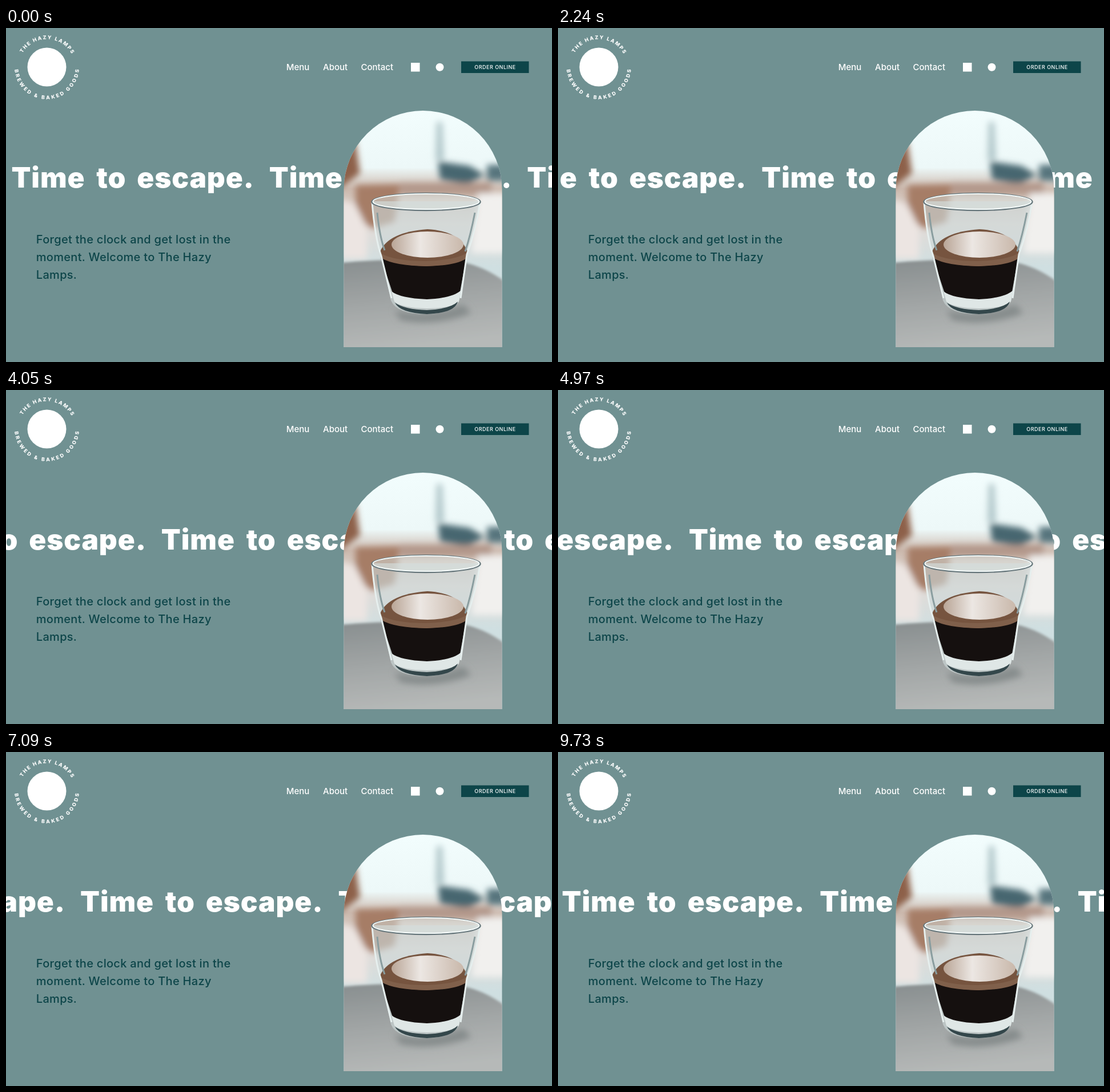
Animation, 956 px wide and 586 px high, one loop 9.8 s. Source, as an HTML page:

```html
<!DOCTYPE html>
<html lang="en">
<head>
<meta charset="utf-8">
<title>Time to escape</title>
<style>
  html, body { margin: 0; width: 100%; height: 100%; overflow: hidden; background: #709192; }
  svg { display: block; width: 100vw; height: 100vh; }
  text { font-family: Inter, "Open Sans", sans-serif; fill: #fff; white-space: pre; }
  .nav { font-size: 15px; font-weight: 500; }
  .order { font-size: 9px; font-weight: 500; letter-spacing: .5px; text-anchor: middle; }
  .ring { font-size: 8.8px; font-weight: 800; text-anchor: middle; }
  .intro { font-size: 20px; font-weight: 500; letter-spacing: .3px; fill: #0d4549; }
  .slogan { font-size: 49.5px; font-weight: 900; letter-spacing: .9px; }
</style>
</head>
<body>
<svg viewBox="0 0 956 586" preserveAspectRatio="none">
  <defs>
    <clipPath id="arch"><path d="M591.5 560V283.5A138.5 138.5 0 0 1 868.5 283.5V560Z"/></clipPath>
    <filter id="soft" x="-50%" y="-50%" width="200%" height="200%"><feGaussianBlur stdDeviation="6"/></filter>
    <filter id="haze" x="-50%" y="-50%" width="200%" height="200%"><feGaussianBlur stdDeviation="2"/></filter>
    <linearGradient id="room" x1="0" y1="0" x2="0" y2="1">
      <stop offset="0" stop-color="#f2fdfd"/>
      <stop offset=".24" stop-color="#edf8f8"/>
      <stop offset=".33" stop-color="#cdbbb0"/>
      <stop offset=".48" stop-color="#e2dbd7"/>
      <stop offset=".66" stop-color="#cfdfe1"/>
    </linearGradient>
    <linearGradient id="stone" x1="0" y1="0" x2=".2" y2="1">
      <stop offset="0" stop-color="#888e8f"/>
      <stop offset=".5" stop-color="#a1a5a5"/>
      <stop offset="1" stop-color="#b6b9b8"/>
    </linearGradient>
    <linearGradient id="foam" x1="0" y1="0" x2="1" y2="0">
      <stop offset="0" stop-color="#b9a596"/>
      <stop offset=".4" stop-color="#ece7e3"/>
      <stop offset="1" stop-color="#c9b8ab"/>
    </linearGradient>
    <path id="upper" d="M22.5 68.5A49 49 0 0 1 120.5 68.5"/>
    <path id="lower" d="M18.4 49.2A56.5 56.5 0 1 0 124.6 49.2"/>
  </defs>

  <rect width="956" height="586" fill="#709192"/>

  <circle cx="71.5" cy="68.5" r="34" fill="#fff"/>
  <text class="ring" letter-spacing="1.9"><textPath href="#upper" startOffset="51%">THE HAZY LAMPS</textPath></text>
  <text class="ring" letter-spacing="2.9"><textPath href="#lower" startOffset="50.7%">BREWED &amp; BAKED GOODS</textPath></text>

  <text class="nav" x="490.7" y="74">Menu</text>
  <text class="nav" x="555" y="74">About</text>
  <text class="nav" x="621.5" y="74">Contact</text>
  <rect x="709" y="61" width="15.5" height="15.5" fill="#fff"/>
  <circle cx="759.5" cy="68.7" r="7" fill="#fff"/>
  <rect x="797" y="58.5" width="118.5" height="20.5" fill="#0d4549"/>
  <text class="order" x="856.5" y="72.2">ORDER ONLINE</text>

  <text class="intro" x="52.8" y="378">Forget the clock and get lost in the</text>
  <text class="intro" x="52.8" y="409">moment. Welcome to The Hazy</text>
  <text class="intro" x="52.8" y="440">Lamps.</text>

  <g id="marquee"></g>

  <g clip-path="url(#arch)">
    <rect x="591" y="145" width="278" height="416" fill="url(#room)"/>
    <g filter="url(#soft)">
      <path d="M580 195L612 200L620 255L580 285Z" fill="#8d6149"/>
      <path d="M754 165H764L767 232H752Z" fill="#b2c8cb"/>
      <path d="M756 234L812 242L838 258L808 274L760 266Z" fill="#46666f"/>
      <path d="M842 240H875V268H842Z" fill="#57747d"/>
      <path d="M612 276L690 274L680 340L640 352L612 330Z" fill="#a67d66"/>
      <path d="M690 272H850V292H690Z" fill="#b2978a"/>
      <path d="M585 300L612 310L632 350V405H585Z" fill="#ece5e2"/>
      <path d="M826 290H880V395H815Z" fill="#f1f0ee"/>
    </g>
    <path d="M585 412Q690 403 790 409Q835 416 875 446V565H585Z" fill="url(#stone)" filter="url(#haze)"/>
    <path d="M680 495Q740 510 800 485L815 500Q750 525 690 512Z" fill="#858b8b" filter="url(#soft)"/>

    <path d="M640 304Q645 370 657 400L674 478Q684 502 736 502Q786 500 794 476L807 395Q824 350 831 304Z" fill="#ced9d9" fill-opacity=".62"/>
    <path d="M655 392Q670 358 738 353Q794 356 808 392L802 412Q735 432 660 412Z" fill="#76543f"/>
    <ellipse cx="738" cy="380" rx="63" ry="23" fill="url(#foam)"/>
    <path d="M656 402Q680 416 736 418Q790 416 806 402L794 468Q738 488 678 468Z" fill="#15100f"/>
    <path d="M655 395Q680 409 735 409Q790 407 808 394L805 405Q786 417 736 418Q680 417 658 404Z" fill="#80604b"/>
    <path d="M675 462Q690 474 737 476Q782 474 797 460L793 480Q784 491 737 492Q692 491 680 480Z" fill="#dfe7e6"/>
    <path d="M681 482Q698 494 737 495Q778 493 791 480Q786 500 737 502Q690 500 681 482Z" fill="#34474b"/>
    <path d="M641 306Q646 368 657 400L675 474M830 306Q823 354 807 397L796 474" fill="none" stroke="#e6efee" stroke-width="3"/>
    <path d="M650 324Q654 365 663 390M821 324Q813 365 804 392" fill="none" stroke="#8a9d9f" stroke-width="3"/>
    <ellipse cx="735.5" cy="305" rx="95" ry="15" fill="#dce5e4" fill-opacity=".5" stroke="#65757a" stroke-width="2.5"/>
    <ellipse cx="735.5" cy="304.5" rx="93" ry="13.5" fill="none" stroke="#f4faf9" stroke-width="2"/>
  </g>
</svg>
<script>
  const LOOP = 9800;      // ms
  const SPEED = 0.04666;  // px per ms
  const PERIOD = 451.4;   // px between repeats
  const START = 9.5;
  const marquee = document.getElementById("marquee");

  const phrase = x => `<text class="slogan" y="279.6">
    <tspan x="${x}">Time</tspan><tspan x="${x + 148.8}">to</tspan><tspan x="${x + 219.8}">escape.</tspan></text>`
    .replace(/>\s+</g, "><");

  marquee.innerHTML = [0, 1, 2, 3].map(i => phrase(START + i * PERIOD)).join("");

  function draw(t) {
    marquee.setAttribute("transform", `translate(${(-t * SPEED).toFixed(2)} 0)`);
  }

  const begin = performance.now();
  function tick() {
    draw((performance.now() - begin) % LOOP);
    requestAnimationFrame(tick);
  }
  tick();
</script>
</body>
</html>
```
